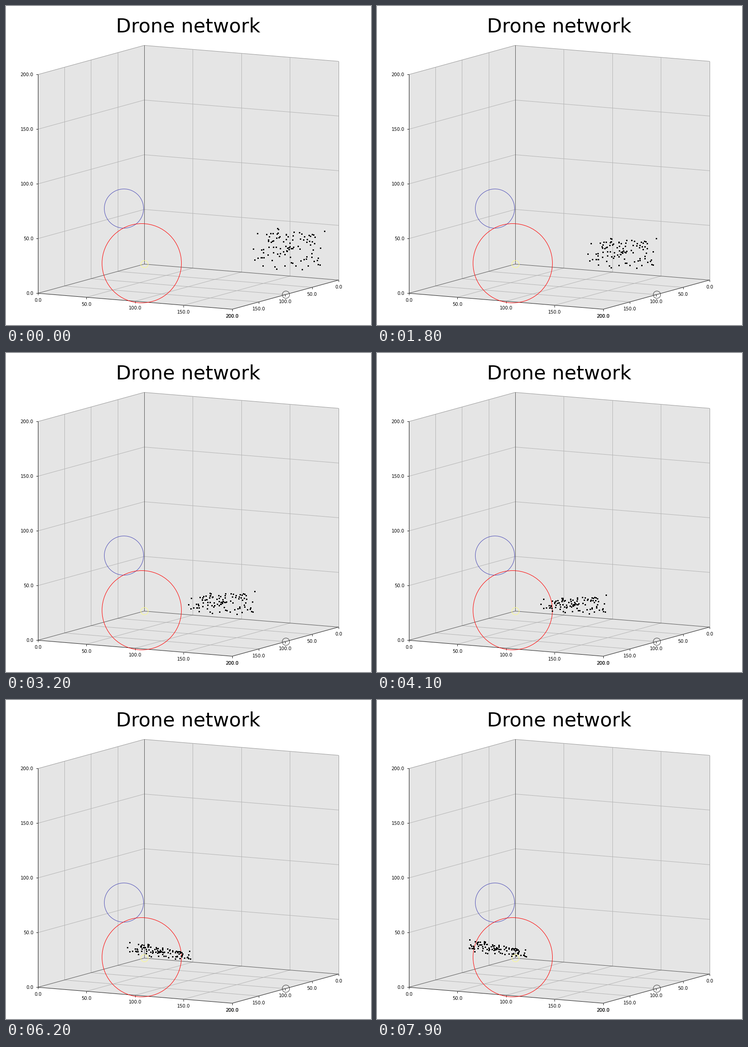
A matplotlib script for the animation above (8 s loop, 800 px wide and 700 px high).

```python
import numpy as np
import matplotlib.pyplot as plt
from matplotlib.animation import FuncAnimation
from matplotlib.collections import EllipseCollection
from matplotlib.patches import Circle, Polygon

W, H, DPI = 800, 700, 100
FRAMES, STEP = 80, 100
PX = 72 / DPI  # one pixel in points
SIDE = 200
COUNT = 100
GATE_X, TURN_X = 389, 202
CRUISE, CLIMB = 44.7, 3.7  # pixels per second past the gate
INK, EDGE, RIM, GRID = "#1a1a1a", "#555555", "#999999", "#b4b4b4"

plt.rcParams["font.family"] = "DejaVu Sans"
fig = plt.figure(figsize=(W / DPI, H / DPI), dpi=DPI, facecolor="white")
ax = fig.add_axes([0, 0, 1, 1])
ax.set(xlim=(0, W), ylim=(H, 0))
ax.axis("off")


def project(a, b, z):
    """Parallel projection of the cube to stage pixels."""
    return (302.9 + 2.13 * a - 1.165 * b,
            566.4 + 0.175 * a + 0.32 * b - 2.4 * z)


def line(p, q, color):
    ax.plot(*zip(p, q), color=color, lw=PX, solid_capstyle="butt", zorder=2)


def path(color, *corners):
    for p, q in zip(corners, corners[1:]):
        line(project(*p), project(*q), color)


def label(x, y, value, ha="center"):
    ax.text(x, y, f"{value:.1f}", fontsize=10 * PX, ha=ha,
            va="center_baseline", color="black", zorder=3)


def ring(x, y, r, color):
    ax.add_patch(Circle((x, y), r, fill=False, ec=color, lw=PX, zorder=4))


def draw_box():
    s = SIDE
    origin, top = (0, 0, 0), (0, 0, s)
    left, left_top = (0, s, 0), (0, s, s)
    right, right_top = (s, 0, 0), (s, 0, s)
    front = (s, s, 0)
    for wall in ((origin, left, left_top, top),
                 (origin, right, right_top, top),
                 (origin, right, front, left)):
        ax.add_patch(Polygon([project(*p) for p in wall], fc="#e5e5e5",
                             ec="none", zorder=1))
    for v in range(50, s, 50):
        path(GRID, (0, v, s), (0, v, 0), (s, v, 0))
        path(GRID, (v, 0, s), (v, 0, 0), (v, s, 0))
        path(GRID, (0, s, v), (0, 0, v), (s, 0, v))
    path(RIM, left_top, top, right_top, right)
    path(EDGE, top, origin)
    path(EDGE, left, origin, right)
    path(INK, left_top, left, front, right)


def draw_ticks():
    for v in range(0, SIDE + 1, 50):
        x, y = project(0, SIDE, v)
        line((x - 4, y), (x, y), INK)
        label(60, y, v, "right")
        for a, b in ((v, SIDE), (SIDE, v)):
            x, y = project(a, b, 0)
            line((x, y), (x, y + 4), INK)
            label(x, y + 14.5, v)


draw_box()
draw_ticks()
ax.text(399.5, 58, "Drone network", fontsize=42.7 * PX, ha="center",
        va="baseline", color="black")
ring(303.5, 566.5, 8, "#ffff80")
ring(613.5, 633.5, 8, "#404040")
ring(258.5, 444.5, 43, "#5050b8")
ring(297.5, 564.5, 87, "#ff0000")

# The swarm starts scattered through a block in the right corner of the cube.
rng = np.random.default_rng(4)
x0, y0 = project(*rng.uniform((135, 0, 12), (190, 50, 45), (COUNT, 3)).T)

# Each drone flies straight to its own height at the gate, then along the axis.
u, v = (x0 - 534) / 169, (y0 - 488) / 88
gate_y = 537 + 16 * u + 31 * v - 14 * u * v
speed = 45.4 + 2.6 * u - 2.2 * v
gate_t = (x0 - GATE_X) / speed


def positions(t):
    before = np.minimum(t, gate_t)
    after = np.maximum(t - gate_t, 0)
    x = x0 - speed * before - CRUISE * after
    y = y0 + (gate_y - y0) * before / gate_t - CLIMB * after
    x = np.maximum(x, TURN_X + 0.3 * (TURN_X - x))  # slow drift back
    return np.column_stack([x, y])


drones = EllipseCollection(
    2, 2, 0, units="xy", offsets=positions(0), offset_transform=ax.transData,
    facecolors="none", edgecolors="black", linewidths=0.8 * PX,
    antialiaseds=False, zorder=5)
ax.add_collection(drones)


def update(frame):
    # Whole-pixel centres keep the tiny rings crisp.
    drones.set_offsets(np.floor(positions(frame * STEP / 1000)) + 0.5)
    return drones,


anim = FuncAnimation(fig, update, frames=FRAMES, interval=STEP, repeat=True,
                     repeat_delay=0)
plt.show()
```
